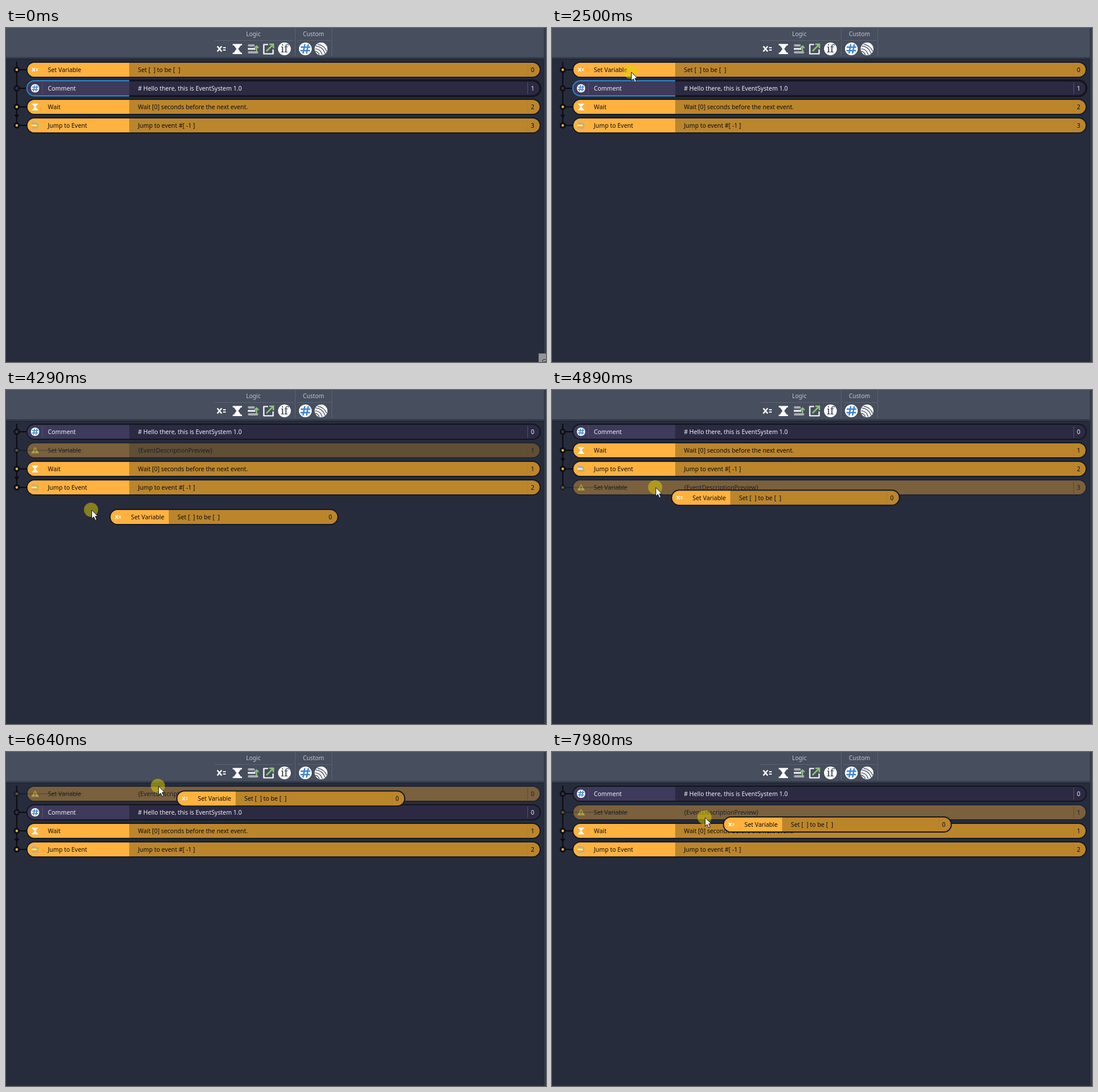
An HTML page that plays this animation: 929x576 px, repeating every 8000 ms.

```html
<!DOCTYPE html>
<html lang="en">
<head>
<meta charset="utf-8">
<title>Event list</title>
<style>
html, body { margin: 0; width: 100%; height: 100%; overflow: hidden; background: #262c3b; }
svg { display: block; width: 929px; height: 576px; }
text { font: 10.35px "Noto Sans", "Open Sans", sans-serif; white-space: pre; }
.mid { text-anchor: middle; }
.head { font-size: 10.1px; fill: #c3c7cf; }
</style>
</head>
<body>
<svg id="stage" viewBox="0 0 929 576"></svg>
<script>
const LOOP = 8000, ROW = 32, TOP = 72, DRAG = 2700, LAG = 70, BLACK = '#0a0b10';

const icons = {
  blank: '',
  set: '<path d="M-7.500-4.500L0 4.500M0-4.500L-7.500 4.500" stroke="#fff" stroke-width="2.400"/><path d="M2.500-2h4.500M2.500 2h4.500" stroke="#fff" stroke-width="2.200"/>',
  wait: '<path d="M-8-8.500H8V-6H6L1.500 0 6 6.500H8V9H-8V6.500H-6L-1.500 0-6-6H-8z" fill="#fff"/>',
  jump: '<path d="M-7-6H1M-7 6H7" stroke="#a9acb4" stroke-width="4" stroke-linecap="round"/><path d="M-9 0H4" stroke="#f2f2f4" stroke-width="3"/><path d="M6 4V-4M2.500-1.500L6-5 9.500-1.500" fill="none" stroke="#8fc27c" stroke-width="2.200"/>',
  link: '<path d="M-1-7.500H-8.500V8.500H7.500V1" fill="none" stroke="#fff" stroke-width="2.200" stroke-linejoin="round"/><path d="M-4 4L7-7M1-8H8V-1" fill="none" stroke="#8fc27c" stroke-width="2.500"/>',
  cond: '<circle r="11" fill="#fff"/><text class="mid" y="6" style="font:18px Noto Serif,serif" fill="#333a48">if</text>',
  note: '<circle r="11" fill="#fff"/><path d="M-1-8L-4 8M5-8L2 8M-8-3H8.500M-8.500 3H8" stroke="#3f83cc" stroke-width="2.400"/>',
  emit: '<circle r="11" fill="#fff"/><path d="M-9-5Q3-4 7 8M-6-8Q6-6 9.500 4M-10 0Q-1 0 2 10M-10 4Q-5 5-3 10" fill="none" stroke="#596070" stroke-width="1.500"/>',
  warn: '<path d="M0-9L10 8H-10z" fill="#b3a148"/><path d="M0-4V3M0 4.500V6.500" stroke="#6b5426" stroke-width="2"/>'
};
const icon = (name, x, y, k = 1) => `<g transform="translate(${x} ${y}) scale(${k})">${icons[name]}</g>`;

// Capsule with its left edge at x = 0 and its centre line at y = 0
function card(pic, name, desc, width, split, note) {
  const [left, right, ink, edge] = note
    ? ['#3d3a5c', '#2c2a43', '#f0f0f4', '#14141f']
    : ['#ffb23f', '#bb852c', '#0d0e13', '#151924'];
  return `<rect x="-1" y="-13" width="${width + 2}" height="26" rx="13" fill="${right}" stroke="${edge}" stroke-width="2"/>
    <rect class="hover" width="${width}" y="-12" height="24" rx="12" fill="${left}" display="none"/>
    <path d="M12-12H${split}V12H12a12 12 0 0 1 0-24z" fill="${left}"/>
    <path d="M${width - 20.5}-10v20${note ? 'M25.500-10v20' : ''}" stroke="${note ? '#54516f' : '#b27e2a'}"/>
    ${icon(pic, 13, 0, .66)}
    <g fill="${ink}"><text x="35" y="4">${name}</text><text x="${split + 15}" y="4">${desc}</text>
    <text class="num mid" x="${width - 12}" y="4"></text></g>`;
}

const chosen = `<g id="chosen" fill="none">
  <path d="M212-13.500H906a13.500 13.500 0 0 1 0 27H212" stroke="#14141f" stroke-width="3.500"/>
  <path d="M212-13H49a13 13 0 0 0 0 26H212" stroke="#2f86cc" stroke-width="2"/></g>`;

function row(id, pic, name, desc, extra = '') {
  const note = id === 'note', slot = id === 'slot';
  return `<g id="${id}"><g opacity="${slot ? .39 : 1}">
    <path d="M19 0H37" stroke="${BLACK}" stroke-width="2"/>
    <circle cx="18.500" r="4.200" fill="#20232c" stroke="${BLACK}" stroke-width="2"/>
    <circle cx="18.500" r="2" fill="${note ? '#34324e' : '#ffc044'}"/>
    <g transform="translate(37 0)">${card(pic, name, desc, 881, 175, note)}</g></g>
    ${extra}</g>`;
}

const stage = document.getElementById('stage');
stage.innerHTML = `
  <rect width="929" height="576" fill="#262c3b"/>
  <rect width="929" height="51" fill="#474e5d"/>
  <path d="M0 51.500H925" stroke="#343c4e" stroke-width="3"/>
  <path d="M0 53.500H925" stroke="#1d222e"/>
  <path d="M927 0V576" stroke="#343c4f" stroke-width="4"/>
  <path d="M925 53V576" stroke="#1e2330"/>
  <path d="M359 21.500H494M501 21.500H559M497.500 0V48M560.500 0V48" stroke="#5b6271"/>
  <text class="head mid" x="425.500" y="14">Logic</text>
  <text class="head mid" x="529" y="14">Custom</text>
  ${['set', 'wait', 'jump', 'link', 'cond'].map((n, i) => icon(n, 371 + 27 * i, 36)).join('')}
  ${icon('note', 515, 36)}${icon('emit', 542, 36)}
  <path d="M18.500 58V168" stroke="${BLACK}" stroke-width="2"/>
  ${row('set', 'set', 'Set Variable', 'Set [  ] to be [  ]')}
  ${row('slot', 'blank', 'Set Variable', '{EventDescriptionPreview}',
    icon('warn', 50, 0, .66) + '<path d="M37 0H130" stroke="#14161d" opacity=".4"/>')}
  ${row('note', 'note', 'Comment', '# Hello there, this is EventSystem 1.0', chosen)}
  ${row('wait', 'wait', 'Wait', 'Wait [0] seconds before the next event.',
    `<path d="M14 13.500h9l-4.500 6z" fill="${BLACK}"/>`)}
  ${row('jump', 'jump', 'Jump to Event', 'Jump to event #[ -1 ]')}
  <g id="tip"><rect x="916.500" y="561.500" width="20" height="20" fill="#93959a" stroke="#6d7078"/>
    <text x="922" y="579" fill="#22252c">G</text></g>
  <g id="ghost">${card('set', 'Set Variable', 'Set [  ] to be [  ]', 390, 100)}</g>
  <g id="pointer"><circle id="press" cx="-.7" cy=".5" r="12.200" fill="#e6d200" opacity=".5"/>
    <path d="M.5 1V16L4 12.800 6.500 18.500 9 17.500 6.600 11.800H11z" fill="#fff" stroke="#15171d"/></g>`;

const part = Object.fromEntries([...stage.querySelectorAll('[id]')].map(e => [e.id, e]));
const show = (e, on) => e.setAttribute('display', on ? 'inline' : 'none');
const move = (e, x, y) => e.setAttribute('transform', `translate(${x} ${y})`);
part.ghost.querySelector('.num').textContent = 0;

// Places where the pointer rests or turns: arrival, departure, x, y
const stops = [
  [0, 590, 929, 576], [1220, 1335, 178, 55], [1620, 2000, 147, 72], [2230, 2650, 136, 75],
  [3080, 3150, 166, 88], [3490, 3490, 169, 115], [3630, 3630, 160, 190], [4220, 4400, 147, 206],
  [5360, 5360, 208, 130], [5480, 5480, 233, 130], [6020, 6410, 262, 89], [6640, 7110, 262, 58],
  [7900, LOOP, 263, 112]
];
function pointerAt(t) {
  const i = stops.findIndex(s => t <= s[1]), [arrive, , x, y] = stops[i];
  if (t >= arrive || !i) return [x, y];
  const [, leave, x0, y0] = stops[i - 1], k = (t - leave) / (arrive - leave);
  return [x0 + (x - x0) * k, y0 + (y - y0) * k];
}

function draw(t) {
  const drag = t >= DRAG;
  const [x, y] = pointerAt(t), [ghostX, ghostY] = pointerAt(t - LAG);
  const order = drag ? ['note', 'wait', 'jump'] : ['set', 'note', 'wait', 'jump'];
  const number = Object.fromEntries(order.map((id, i) => [id, i]));

  // The gap follows the pointer inside the list and falls back to 1 below it
  if (drag) {
    const below = y > TOP + 3.5 * ROW;
    number.slot = below ? 1 : Math.max(0, Math.round((y - TOP + 1) / ROW));
    order.splice(number.slot, 0, 'slot');
  }
  const hovered = drag ? Math.ceil((y - TOP) / ROW + .5) - 1 : -1;
  order.forEach((id, i) => {
    move(part[id], 0, TOP + ROW * i);
    part[id].querySelector('.num').textContent = number[id];
    show(part[id].querySelector('.hover'), i === hovered);
  });

  show(part.set, !drag);
  show(part.slot, drag);
  show(part.chosen, !drag);
  show(part.ghost, drag);
  show(part.tip, t < 70);
  show(part.press, t >= 2230);
  show(part.pointer, t > 590);
  move(part.pointer, x, y);
  move(part.ghost, ghostX + 33, ghostY + 13);
}

function frame() {
  draw(performance.now() % LOOP);
  requestAnimationFrame(frame);
}
frame();
</script>
</body>
</html>
```
